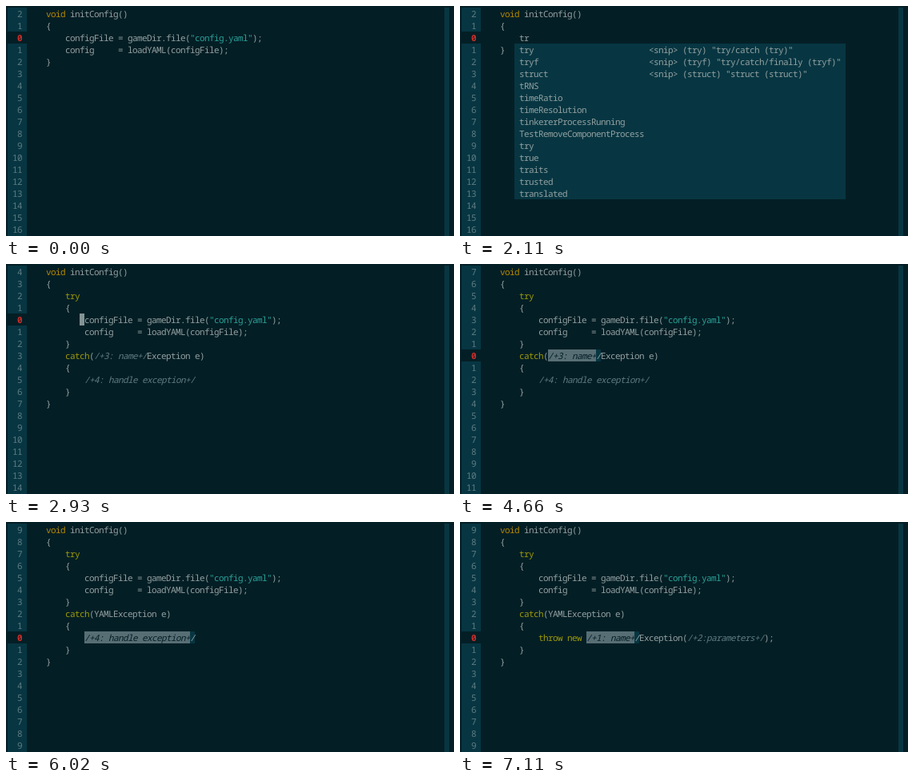
An HTML page for the animation above (8 s loop, 560x288 px).

```html
<!DOCTYPE html>
<html lang="en">
<head>
<meta charset="utf-8">
<title>Editor session</title>
<style>
  html, body { margin: 0; width: 100%; height: 100%; overflow: hidden; background: #041e25; }
  #stage {
    position: relative; width: 560px; height: 288px; overflow: hidden;
    font: 11px/15px "Noto Sans Mono", "DejaVu Sans Mono", monospace;
    font-variant-ligatures: none; text-rendering: geometricPrecision;
    color: #93a1a1; white-space: pre;
  }
  #stage div { position: absolute; }
  #stage span { display: inline-block; height: 15px; line-height: 17px; vertical-align: top; }
  .gutter { left: 2px; top: 2px; width: 24px; height: 286px; background: #073642; }
  .strip { left: 548px; top: 2px; width: 6px; height: 286px; background: #073642; }
  .num { left: 2px; width: 24px; height: 15px; line-height: 17px; color: #5f7b82; }
  .num.now { background: #041e25; color: #cb2f2b; font-weight: bold; }
  .line { left: 26px; height: 15px; }
  .type { color: #b58900; }
  .key { color: #9c9a08; }
  .str { color: #2aa198; }
  .note { color: #5f7b82; font-style: italic; }
  .sel { background: #586e75; color: #041e25; }
  .end { background: #073642; color: #93a1a1; }
  .block { background: #839496; color: #041e25; }
  .bar { width: 2px; height: 15px; background: #93a1a1; }
  .speck { left: 236px; top: 140px; width: 1px; height: 3px; background: #586e75; }
  .menu { background: #073642; box-sizing: border-box; padding: 1px 0 0 6px; }
</style>
</head>
<body>
<div id="stage"></div>
<script>
const CELL = 6, ROW = 15, LEFT = 26, TOP = 2, ROWS = 19, LOOP = 8000;
const stage = document.getElementById('stage');

// Keep the terminal grid at one character per cell.
const probe = document.createElement('span');
probe.textContent = '0'.repeat(100);
stage.append(probe);
stage.style.letterSpacing = CELL - probe.getBoundingClientRect().width / 100 + 'px';

const wrap = body => ['    void initConfig()', '    {', ...body, '    }'];
const load = pad => [
  pad + 'configFile = gameDir.file("config.yaml");',
  pad + 'config     = loadYAML(configFile);'
];
const plain = wrap(load(' '.repeat(8)));
const typed = word => wrap(['        ' + word]);
const guarded = (name = '/+3: name+/', body = '/+4: handle exception+/') => wrap([
  '        try', '        {', ...load(' '.repeat(12)), '        }',
  `        catch(${name}Exception e)`, '        {', ' '.repeat(12) + body, '        }'
]);
const thrown = body => guarded('YAML', body);

const snip = (width, word, text) => word.padEnd(width) + `<snip> (${word}) "${text} (${word})"`;
const menu = (col, row, width, items) => ({ col, row, width, items });

const trySnips = w => [snip(w, 'try', 'try/catch'), snip(w, 'tryf', 'try/catch/finally')];
const trMenu = menu(8, 3, 414, [
  ...trySnips(27), snip(27, 'struct', 'struct'),
  'tRNS', 'timeRatio', 'timeResolution', 'tinkererProcessRunning',
  'TestRemoveComponentProcess', 'try', 'true', 'traits', 'trusted', 'translated'
]);
const tryMenu = menu(8, 3, 384, [...trySnips(22), 'try']);
const yamlMenu = menu(14, 8, 96, ['', 'Node', 'Null', 'Merge', 'Object', 'Source',
  'Version', 'Version_', 'Container', 'Exception'].map(s => 'YAML' + s));
// The last, empty row runs off the bottom of the screen.
const thMenu = menu(12, 10, 288, [
  snip(12, 'this', 'constructor'), snip(12, 'with', 'with'), snip(12, 'catch', 'catch'),
  'toHash', 'tzHours', 'tagHash', 'this', 'throw', 'tharsis', ''
]);

const sel = (row, from, to) => ({ row, from, to, cls: 'sel' });
const at = (row, col, cls = 'block') => ({ row, from: col, to: col + 1, cls });
const slot = (row, from, to) => [sel(row, from, to - 1), at(row, to - 1, 'end')];
const first = sel(2, 0, 49), second = sel(3, 0, 42);
const bodySel = [sel(4, 12, 53), sel(5, 0, 45), at(5, 45, 'end')];

// time, text, current row, extras
const steps = [
  [0, plain, 2],
  [40, plain, 2, { marks: [at(2, 24)] }],
  [770, plain, 2, { marks: [first] }],
  [810, plain, 2, { marks: [first, at(2, 24)] }],
  [970, plain, 3, { marks: [first, second] }],
  [1010, plain, 3, { marks: [first, second, at(3, 24)] }],
  [1190, typed(''), 2],
  [1270, typed(''), 2, { bar: 8 }],
  [1650, typed('t'), 2],
  [1730, typed('t'), 2, { bar: 9 }],
  [1970, typed('tr'), 2],
  [2010, typed('tr'), 2, { bar: 10 }],
  [2110, typed('tr'), 2, { menu: trMenu }],
  [2150, typed('try'), 2, { menu: tryMenu }],
  [2190, typed('try'), 2, { menu: tryMenu, bar: 11 }],
  [2930, guarded(), 4, { marks: [at(4, 11)] }],
  [2970, guarded(), 5],
  [3010, guarded(), 5, { marks: bodySel.slice(0, 2) }],
  [3050, guarded(), 5, { marks: bodySel }],
  [4030, guarded(), 5],
  [4150, guarded(), 5, { bar: 46 }],
  [4580, guarded(), 7],
  [4620, guarded(), 7, { marks: [sel(7, 14, 24)] }],
  [4660, guarded(), 7, { marks: slot(7, 14, 25) }],
  [5250, guarded('Y'), 7],
  [5290, guarded('Y'), 7, { bar: 15 }],
  [5430, guarded('YA'), 7],
  [5470, guarded('YA'), 7, { bar: 16 }],
  [5510, guarded('YA'), 7, { menu: yamlMenu, bar: 16 }],
  [5630, guarded('YAM'), 7, { menu: yamlMenu }],
  [5710, guarded('YAML'), 7, { menu: yamlMenu }],
  [5750, guarded('YAML'), 7, { menu: yamlMenu, bar: 18 }],
  [5980, thrown(), 9],
  [6020, thrown(), 9, { marks: slot(9, 12, 35) }],
  [6600, thrown('t'), 9, { speck: true }],
  [6640, thrown('t'), 9, { speck: true, bar: 13 }],
  [6690, thrown('th'), 9, { speck: true }],
  [6730, thrown('th'), 9, { speck: true, menu: thMenu }],
  [6770, thrown('th'), 9, { speck: true, menu: thMenu, bar: 14 }],
  [6860, thrown('thr'), 9, { speck: true, menu: thMenu }],
  [6900, thrown('thr'), 9, { speck: true, menu: thMenu, bar: 15 }],
  [7070, thrown('throw new /+1: name+/Exception(/+2:parameters+/);'), 9],
  [7110, thrown('throw new /+1: name+/Exception(/+2:parameters+/);'), 9, { marks: slot(9, 22, 33) }]
];

const syntax = /(?<note>\/\+.*?\+\/)|(?<str>"[^"]*")|\b(?<type>void)\b|\b(?<key>try|catch|throw|new)\b/g;

function add(parent, tag, cls, text = '') {
  const el = document.createElement(tag);
  el.className = cls;
  el.textContent = text;
  parent.append(el);
  return el;
}

function place(el, col, row) {
  el.style.left = LEFT + col * CELL + 'px';
  el.style.top = TOP + row * ROW + 'px';
  return el;
}

function drawLine(text, row, marks) {
  const cls = Array(text.length).fill('');
  for (const m of text.matchAll(syntax)) {
    const kind = Object.keys(m.groups).find(k => m.groups[k]);
    cls.fill(kind, m.index, m.index + m[0].length);
  }
  for (const m of marks) {
    if (m.row !== row) continue;
    for (let i = m.from; i < m.to && i < text.length; i++)
      cls[i] = cls[i].replace(/ ?(sel|end|block)/, '') + ' ' + m.cls;
  }
  const line = place(add(stage, 'div', 'line'), 0, row);
  for (let i = 0, j; i < text.length; i = j) {
    for (j = i + 1; j < text.length && cls[j] === cls[i];) j++;
    add(line, 'span', cls[i], text.slice(i, j));
  }
}

function draw([, lines, now, extra = {}]) {
  stage.textContent = '';
  add(stage, 'div', 'gutter');
  add(stage, 'div', 'strip');
  for (let r = 0; r < ROWS; r++) {
    const num = add(stage, 'div', r === now ? 'num now' : 'num', String(Math.abs(r - now)).padStart(3));
    num.style.top = TOP + r * ROW + 'px';
  }
  lines.forEach((text, r) => drawLine(text, r, extra.marks || []));
  if (extra.speck) add(stage, 'div', 'speck');
  if (extra.bar) place(add(stage, 'div', 'bar'), extra.bar, now);
  if (extra.menu) {
    const { col, row, width, items } = extra.menu;
    const box = place(add(stage, 'div', 'menu', items.join('\n')), col - 1, row);
    box.style.width = width + 'px';
    box.style.height = items.length * ROW + 'px';
  }
}

const start = performance.now();
let shown;
function tick() {
  const t = (performance.now() - start) % LOOP;
  const step = steps.findLast(s => s[0] <= t);
  if (step !== shown) draw(shown = step);
  requestAnimationFrame(tick);
}
tick();
</script>
</body>
</html>
```
